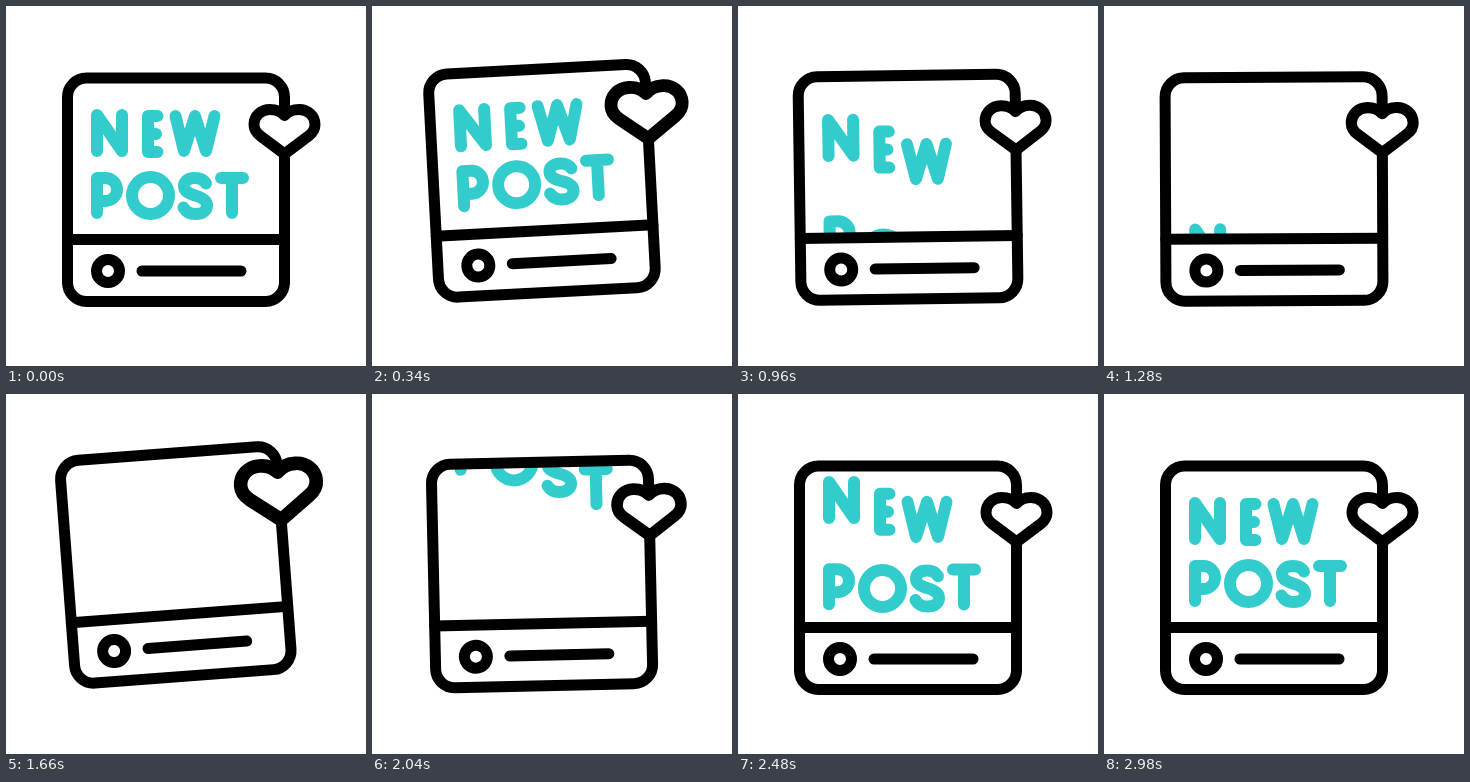
An HTML page that plays this animation: 360 px wide and 360 px high, repeating every 3 s.

```html
<!DOCTYPE html>
<html lang="en">
<head>
<meta charset="utf-8">
<title>New post</title>
<style>
  html, body { margin: 0; width: 100%; height: 100%; overflow: hidden; background: #fff; }
  svg { display: block; width: 100vw; height: 100vh; }
  path, rect, line, circle { stroke-linecap: round; stroke-linejoin: round; }
</style>
</head>
<body>
<svg viewBox="0 0 360 360" role="img" aria-label="New post">
  <clipPath id="screen"><rect x="61.5" y="72" width="217" height="161.5" rx="19"/></clipPath>
  <g id="card" fill="none" stroke="#000" stroke-width="11">
    <g clip-path="url(#screen)">
      <g id="letters" stroke="#33cccc" stroke-width="12"></g>
    </g>
    <rect x="61.5" y="72" width="217" height="223.5" rx="19"/>
    <line x1="61.5" y1="233.5" x2="278.5" y2="233.5"/>
    <circle cx="102" cy="265" r="11.5"/>
    <line x1="136" y1="265" x2="235" y2="265"/>
    <path id="heart" fill="#fff" d="M278.5 109.5C274 104.5 269 103.5 264 103.5C255 103.5 248 110 248 118.5
      C248 124 250.5 127 254.5 130L278.5 148L302.5 130C306.5 127 309 124 309 118.5
      C309 110 302 103.5 293 103.5C288 103.5 283 104.5 278.5 109.5Z"/>
  </g>
</svg>
<script>
const LOOP = 3000;
const STAGGER = 40;

// Listed in the order in which the letters set off: T S O P W E N.
const glyphs = [
  'M215 172H237M226 172V207',
  'M200 177.5C197.5 173.5 193.5 172 189 172C182.500 172 178 175 178 180C178 185.500 183 187.500 189 189.500C196 191.500 201 194 201 199.500C201 205 196 208 189.500 208C184 208 180 206 177.500 201.500',
  'M126 189.5a18.5 18.5 0 1 0 37 0a18.5 18.5 0 1 0 -37 0Z',
  'M91 207V172H99.500a11.500 11.500 0 0 1 0 23H91',
  'M169.500 110L178 145L189 110L200 145L208.500 110',
  'M151.500 110H142V146H151.500M142 128H150',
  'M91 145V109L116 145V109'
];

// Keys are [time, value]; each letter shifts them by its own delay.
const tilt = [[0, 0], [600, -5], [1085, 0], [1200, 0], [1800, -5], [2160, 0]];
const beat = [[0, 1], [600, 1.28], [930, 1], [1200, 1], [1800, 1.28], [2130, 1]];
const fall = [[90, 0], [590, -12], [1190, 138], [1500, 138], [1500, -145], [1800, -145], [2400, 5], [2630, 0]];

const ease = t => t * t * (3 - 2 * t);

function valueAt(keys, time) {
  if (time <= keys[0][0]) return keys[0][1];
  for (let i = 1; i < keys.length; i++) {
    const [t0, v0] = keys[i - 1];
    const [t1, v1] = keys[i];
    if (time < t1) return v0 + (v1 - v0) * ease((time - t0) / (t1 - t0));
  }
  return keys[keys.length - 1][1];
}

const card = document.getElementById('card');
const heart = document.getElementById('heart');
const letters = glyphs.map(d => {
  const path = document.createElementNS('http://www.w3.org/2000/svg', 'path');
  path.setAttribute('d', d);
  return document.getElementById('letters').appendChild(path);
});

function draw(time) {
  card.setAttribute('transform', `rotate(${valueAt(tilt, time)} 0 180)`);
  heart.setAttribute('transform',
    `translate(278.5 153.5) scale(${valueAt(beat, time)}) translate(-278.5 -153.5)`);
  letters.forEach((letter, i) =>
    letter.setAttribute('transform', `translate(0 ${valueAt(fall, time - i * STAGGER)})`));
}

const start = performance.now();
function tick(now) {
  draw(Math.max(0, now - start) % LOOP);
  requestAnimationFrame(tick);
}
draw(0);
requestAnimationFrame(tick);
</script>
</body>
</html>
```
